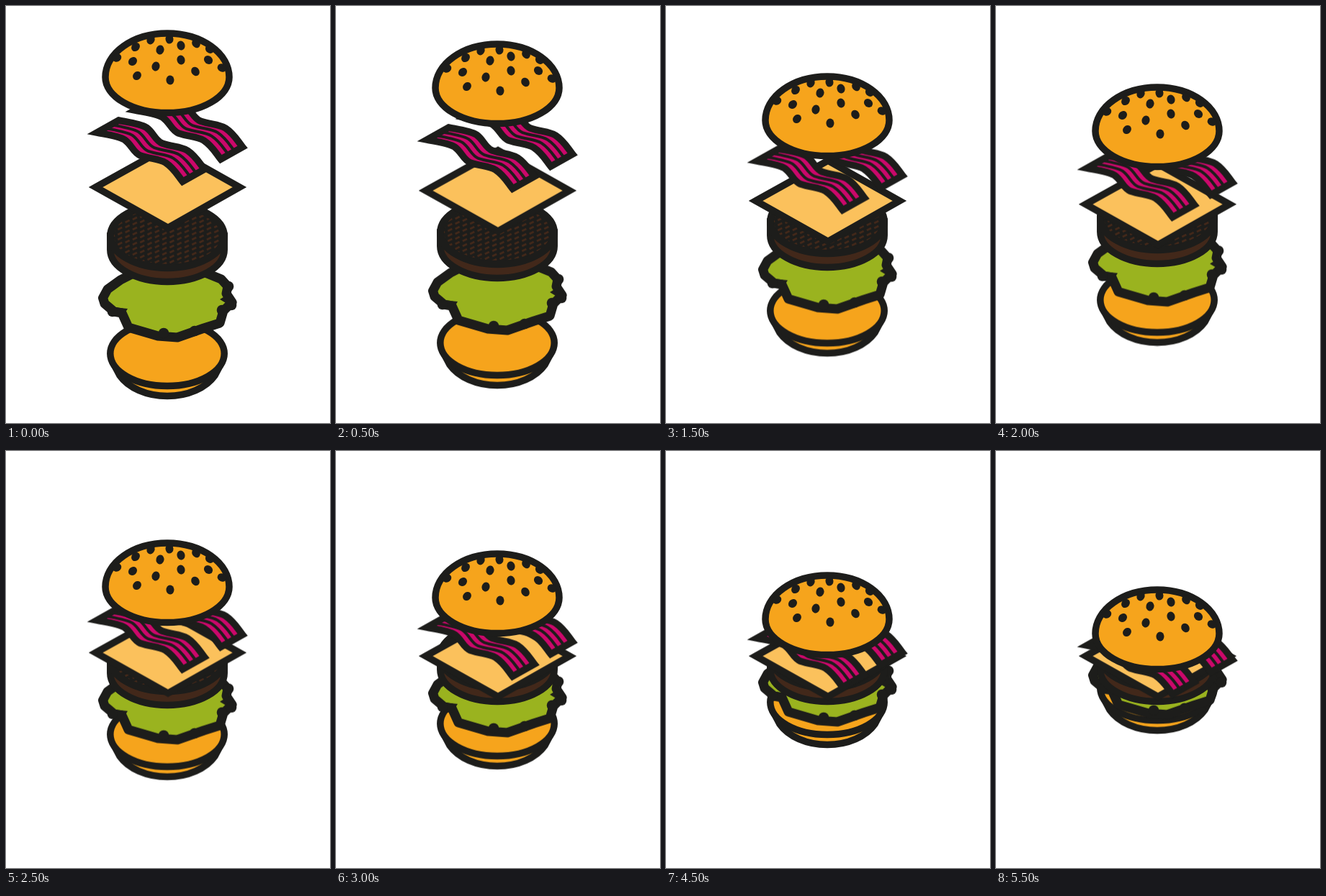
An HTML page for the animation above (6 s loop, 450 by 580 pixels).

```html
<!DOCTYPE html>
<html lang="en">
<head>
<meta charset="utf-8">
<title>Burger</title>
<style>
  html, body { margin: 0; width: 100%; height: 100%; overflow: hidden; background: #fff; }
  svg { display: block; width: 450px; height: 580px; }
  .line { stroke: #1d1d1b; stroke-width: 9.5; }
  .ink { fill: #1d1d1b; }
  .bun { fill: #f6a41c; stroke-linejoin: round; }
  .cheese { fill: #fbc15c; }
  .meat { fill: #42281a; }
  .leaf { fill: #9ab31f; stroke-width: 13; stroke-linejoin: round; }
  .bacon { fill: #cb086b; }
  .stripe { fill: none; stroke: #1d1d1b; stroke-width: 4; }
  #grill path { stroke: #42281a; stroke-width: 2.8; }
</style>
</head>
<body>
<svg viewBox="0 0 450 580">
  <defs>
    <clipPath id="grid"><ellipse cx="224" cy="320" rx="74" ry="39"/></clipPath>
    <g id="rasher"></g>
  </defs>

  <g id="base">
    <path class="bun line" d="M148 495L158 514C170 531 195 542.5 224 542.5S278 531 290 514L300 495Z"/>
    <ellipse class="bun line" cx="224" cy="483.5" rx="79.2" ry="45"/>
  </g>

  <g id="leaf">
    <path class="leaf line" d="M134.5 406L141 394L159 381L200 360H250L299 380L308 390L306 400L314 412L302 424L297 441L275 448L238 461L211 459L170 447L161 427L150 425L137 414Z"/>
    <path class="ink" d="M148 419L169 421L161 434ZM297 408L310 400V416Z"/>
    <g id="knobs" class="ink"></g>
  </g>

  <g id="patty">
    <path class="meat line" d="M144.8 320V339A79.2 44.5 0 0 0 303.2 339V320Z"/>
    <ellipse class="ink line" cx="224" cy="320" rx="79.2" ry="44.5"/>
    <g id="grill" clip-path="url(#grid)"></g>
  </g>

  <g id="cheese">
    <path class="cheese line" d="M124.5 252L225 196L324.5 252L225 308.3Z"/>
  </g>

  <g id="bacon">
    <use href="#rasher" x="53" y="-31"/>
    <use href="#rasher"/>
  </g>

  <g id="crown">
    <path class="bun line" d="M138 99A86 61 0 0 1 310 99A86 49.5 0 0 1 138 99Z"/>
    <g id="seeds" class="ink"></g>
  </g>
</svg>
<script>
const STEPS = 12, LOOP = 6000;
const byId = id => document.getElementById(id);

function add(id, tag, attrs) {
  const el = document.createElementNS('http://www.w3.org/2000/svg', tag);
  for (const k in attrs) el.setAttribute(k, attrs[k]);
  byId(id).appendChild(el);
}

// A rasher is one wavy edge swept sideways; its stripes repeat that edge.
const wave = 'c15.5 3 30.5 5 38.5 10c10 7 12 18 22 22c14 5 25 4 35 10c12 8 17 18 23.6 26.2';
const back = 'c-6.6 -8.2 -11.6 -18.2 -23.6 -26.2c-10 -6 -21 -5 -35 -10c-10 -4 -12 -15 -22 -22c-8 -5 -23 -7 -38.5 -10';
const sweep = f => `M${156.5 - 30.3 * f} ${159 + 17 * f}`;
add('rasher', 'path', { class: 'bacon line', d: `${sweep(0)}${wave}l-30.3 17${back}Z` });
for (const f of [0.36, 0.64]) add('rasher', 'path', { class: 'stripe', d: sweep(f) + wave });

// Sesame seeds lean towards the middle of the bun.
const seeds = [
  [154, 72], [180, 57], [176, 77], [201, 47], [214, 61], [227, 46], [243, 55], [264, 52],
  [243, 75], [281, 75], [283, 60], [300, 86], [263, 91], [208, 84], [182, 97], [228, 103]
];
for (const [x, y] of seeds)
  add('seeds', 'ellipse', { rx: 5.5, ry: 6.5, transform: `translate(${x} ${y}) rotate(${(226 - x) * 0.9})` });

for (const [cx, cy] of [[148, 425], [309, 390], [313, 416], [219, 455], [262, 452], [300, 423]])
  add('knobs', 'circle', { cx, cy, r: 7.3 });

let dashes = '';
for (let i = 0; i < 16; i++)
  for (let j = 0; j < 13; j++)
    dashes += `M${145 + i * 10.3} ${280 + j * 7 + (i % 2) * 3}l6 -3`;
add('grill', 'path', { d: dashes });

// Pixels per step for each layer: while far apart, then while closing up
const speeds = {
  crown: [15, 10],
  bacon: [9.9, 5],
  cheese: [4.75, 0],
  patty: [-5, 0],
  leaf: [-9.9, -5],
  base: [-14.9, -9.9]
};

// The second move is a double step.
function shift([fast, slow], step) {
  const n = step > 1 ? step + 1 : step;
  return fast * Math.min(n, 7) + slow * Math.max(n - 7, 0);
}

for (const id in speeds) {
  const frames = Array.from({ length: STEPS + 1 }, (_, i) => ({
    transform: `translate(0px, ${shift(speeds[id], Math.min(i, STEPS - 1))}px)`,
    offset: i / STEPS,
    easing: 'steps(1, end)'
  }));
  byId(id).animate(frames, { duration: LOOP, iterations: Infinity });
}
</script>
</body>
</html>
```
